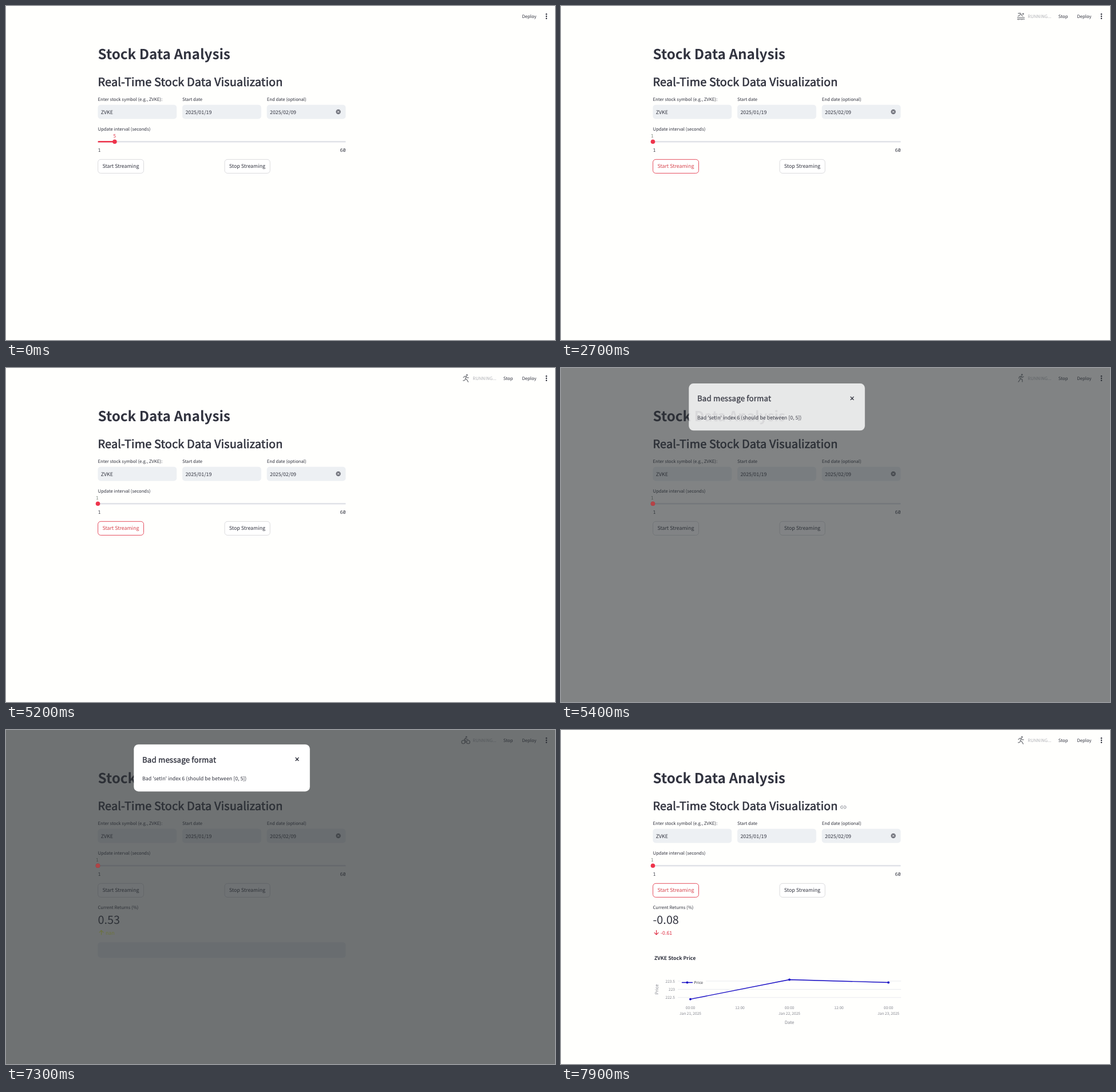
Recreate the animation shown at these times as an HTML page. Size 959 by 584 pixels, loop 8000 ms.

```html
<!DOCTYPE html>
<html lang="en">
<head>
<meta charset="utf-8">
<title>Stock Data Analysis</title>
<style>
  html, body { margin: 0; width: 100%; height: 100%; overflow: hidden; background: #fffffd; }
  svg { display: block; width: 959px; height: 584px; }
  text {
    font: 8.81px "Noto Sans CJK JP", "Noto Sans CJK SC", "Noto Sans CJK", "Noto Sans", sans-serif;
    fill: #31333f; text-rendering: geometricPrecision; white-space: pre;
  }
  .h1 { font-size: 24.23px; font-weight: 700; letter-spacing: .02px; }
  .h2 { font-size: 19.82px; letter-spacing: .18px; stroke: #31333f; stroke-width: .65px; }
  .h3 { font-size: 13.21px; letter-spacing: .18px; stroke: #31333f; stroke-width: .42px; }
  .small { font-size: 7.71px; }
  .mono { font: 8.4px "Noto Sans Mono", "DejaVu Sans Mono", monospace; }
  .value { font-size: 19.82px; }
  .bold { font-weight: 700; }
  .tick { font-size: 6.61px; fill: #84868f; }
  .axis { font-size: 7.71px; fill: #84868f; }
  .mid { text-anchor: middle; }
  .end { text-anchor: end; }
  .line { fill: none; stroke-linecap: round; stroke-linejoin: round; }
  .field { fill: #edf0f3; }
  .button { fill: #fff; stroke: #d6d6da; stroke-width: .9; }
  .sport { stroke: #7c7e83; stroke-width: 1.3; }
  .sport circle.head { fill: #7c7e83; stroke: none; }
</style>
</head>
<body>
<svg viewBox="0 0 959 584">
  <rect width="959" height="584" fill="#fffffd"/>

  <g id="running">
    <g id="runA" class="sport line">
      <circle class="head" cx="805.2" cy="12.2" r="1.5"/>
      <path d="M804 14.6L802.4 18.6L805.2 20.6L807.4 24.4M802.4 18.6L801.4 21.6L798.6 22M799 16.6L801.4 14.4L804 14.6L805.4 16.8L808 17"/>
    </g>
    <g id="runB" class="sport line">
      <circle class="head" cx="805.2" cy="11.8" r="1.5"/>
      <path d="M804 14.4L802.4 18.8L805.6 19.8L805.8 24M802.4 18.8L800.8 21.8L799 24.2M799.8 18L801 14.8L804 14.4L805.8 16.4L808 15"/>
    </g>
    <g id="swimA" class="sport line">
      <circle class="head" cx="806.8" cy="15.4" r="1.5"/>
      <path d="M799 12.4L802.6 12L804.6 15.4L799 18.2M797.4 20.6q1.5-1.3 3 0t3 0t3 0t3 0M797.4 23.4q1.5-1.3 3 0t3 0t3 0t3 0"/>
    </g>
    <g id="swimB" class="sport line">
      <circle class="head" cx="807.2" cy="13.8" r="1.5"/>
      <path d="M798.6 12.8L802.4 12.5L806 17.8M803.2 14.4L798.4 18M797.4 20.3q1.5 1 3 0t3 0t3 0t3 0M797.4 23.1q1.5 1 3 0t3 0t3 0t3 0"/>
    </g>
    <g id="bikeA" class="sport line">
      <circle class="head" cx="804.2" cy="12.2" r="1.4"/>
      <circle cx="798.8" cy="21" r="2.9"/><circle cx="807.4" cy="21" r="2.9"/>
      <path d="M806.8 16.4L804.4 16.2L802.8 14.2L800.4 16.8L803 18.6L802.8 22"/>
    </g>
    <g id="bikeB" class="sport line">
      <circle class="head" cx="804.6" cy="12.4" r="1.4"/>
      <circle cx="798.8" cy="21" r="2.9"/><circle cx="807.4" cy="21" r="2.9"/>
      <path d="M806.8 16.6L804.6 16.4L802.8 14.4L800.4 17L803.6 17.8L801.8 20.8"/>
    </g>
    <text class="small" x="815.3" y="21" style="fill:#afb0b5">RUNNING...</text>
    <text class="small" x="868.8" y="21">Stop</text>
  </g>
  <text class="small" x="901.4" y="21">Deploy</text>
  <g fill="#31333f"><circle cx="944" cy="14.2" r="1.25"/><circle cx="944" cy="18" r="1.25"/><circle cx="944" cy="21.8" r="1.25"/></g>

  <text class="h1" x="160.5" y="93">Stock Data Analysis</text>
  <text class="h2" x="160.5" y="140">Real-Time Stock Data Visualization</text>
  <path id="link" class="line" stroke="#8e9099" d="M492 132.7h-1.3a2.3 2.3 0 0 0 0 4.6h1.3M494.5 132.7h1.3a2.3 2.3 0 0 1 0 4.6h-1.3M491.2 135h4.1"/>

  <text class="small" x="160.5" y="165.8">Enter stock symbol (e.g., ZVKE):</text>
  <text class="small" x="308" y="165.8">Start date</text>
  <text class="small" x="455.7" y="165.8">End date (optional)</text>
  <rect class="field" x="160.4" y="172.8" width="137.8" height="24.6" rx="4.9"/>
  <rect class="field" x="308" y="172.8" width="137.8" height="24.6" rx="4.9"/>
  <rect class="field" x="455.6" y="172.8" width="137.8" height="24.6" rx="4.9"/>
  <text x="165.8" y="188.5">ZVKE</text>
  <text x="313.4" y="188.5">2025/01/19</text>
  <text x="461" y="188.5">2025/02/09</text>
  <circle cx="580.5" cy="185" r="4.2" fill="#70727b"/>
  <path class="line" stroke="#fff" d="M579 183.5l3 3m0-3l-3 3"/>

  <text class="small" x="160.5" y="217.6">Update interval (seconds)</text>
  <rect x="160.5" y="236.1" width="433" height="2.5" rx="1.2" fill="#e0e2e7"/>
  <rect id="fill" x="160.5" y="236.1" height="2.5" rx="1.2" fill="#ee344b"/>
  <circle id="thumb" cy="237.3" r="3.8" fill="#ee344b"/>
  <text id="count" class="mono mid" y="230.2"></text>
  <text class="mono" x="160.6" y="255">1</text>
  <text class="mono end" x="593.6" y="255">60</text>

  <rect id="start" class="button" x="160.6" y="268.3" width="79.9" height="24.1" rx="4.9"/>
  <text id="startText" x="168.4" y="283.4">Start Streaming</text>
  <rect class="button" x="382" y="268.3" width="79.2" height="24.1" rx="4.9"/>
  <text x="389.8" y="283.4">Stop Streaming</text>

  <g id="metric">
    <text class="small" x="160.5" y="313">Current Returns (%)</text>
    <text id="returns" class="value" x="160.5" y="339.3"></text>
    <path id="arrow" class="line" stroke-width="1.2"/>
    <text id="delta" x="174" y="357.7"></text>
  </g>
  <rect id="skeleton" class="field" x="160.4" y="371.3" width="433" height="27" rx="4.9"/>

  <g id="chart">
    <text class="bold" x="163" y="401.5">ZVKE Stock Price</text>
    <path stroke="#e7e9ee" stroke-width=".9" d="M204 439H594M204 453.5H594M204 467.8H594"/>
    <rect x="209" y="433" width="44" height="17" fill="#fffffd"/>
    <g fill="#1207c4">
      <path class="line" stroke="#1207c4" stroke-width="1.35" d="M226 470.7L399 436.5L572 441.5M211.5 441.5H229.5"/>
      <circle cx="226" cy="470.7" r="1.9"/><circle cx="399" cy="436.5" r="1.9"/>
      <circle cx="572" cy="441.5" r="1.9"/><circle cx="220.5" cy="441.5" r="1.9"/>
    </g>
    <text class="tick" x="232.6" y="444.2" style="fill:#31333f">Price</text>
    <text class="tick end" x="199" y="441.6">223.5</text>
    <text class="tick end" x="199" y="456.1">223</text>
    <text class="tick end" x="199" y="470.4">222.5</text>
    <text class="tick mid" x="226" y="488">00:00</text>
    <text class="tick mid" x="312.5" y="488">12:00</text>
    <text class="tick mid" x="399" y="488">00:00</text>
    <text class="tick mid" x="485.5" y="488">12:00</text>
    <text class="tick mid" x="572" y="488">00:00</text>
    <text class="tick mid" x="226" y="498">Jan 21, 2025</text>
    <text class="tick mid" x="399" y="498">Jan 22, 2025</text>
    <text class="tick mid" x="572" y="498">Jan 23, 2025</text>
    <text class="axis mid" x="399" y="514">Date</text>
    <text class="axis mid" transform="translate(170 453.5) rotate(-90)">Price</text>
  </g>

  <g id="shade">
    <rect width="959" height="584" fill="#2b3033" opacity=".68"/>
    <circle cx="160.5" cy="237.3" r="3.8" fill="#b04446"/>
  </g>
  <g id="dialog">
    <rect x="223.3" y="25.2" width="307.5" height="82.2" rx="8" fill="#fff"/>
    <text class="h3" x="238" y="56.5">Bad message format</text>
    <path class="line" stroke="#31333f" stroke-width="1.4" d="M506 48.5l5 5m0-5l-5 5"/>
    <text x="238" y="88">Bad 'setIn' index 6 (should be between [0, 5])</text>
  </g>
</svg>
<script>
const LOOP = 8000, STEP = 100;
const RED = '#e23a4c';
const el = Object.fromEntries([...document.querySelectorAll('[id]')].map(e => [e.id, e]));
const show = (e, on) => { e.style.display = on ? '' : 'none'; };
const clamp = v => Math.max(0, Math.min(1, v));

// [start time, value] pairs, each value held until the next one
const at = (track, t) => track.reduce((v, [from, next]) => t >= from ? next : v, track[0][1]);

const slider = [[0, 5], [100, 4], [300, 3], [500, 2], [700, 1]];
const button = [[0, 'idle'], [1200, 'focus'], [1400, 'down'], [1600, 'focus'], [5400, 'idle'], [7700, 'focus']];
const sports = ['runA', 'runB', 'swimA', 'swimB', 'bikeA', 'bikeB'];
const sport = [
  [0, 'runA'], [2400, 'swimA'], [2700, 'swimB'], [3100, 'swimA'], [3500, 'bikeA'], [3800, 'bikeB'],
  [4100, 'swimA'], [4400, 'bikeA'], [4600, 'bikeB'], [4800, 'swimA'], [5000, 'swimB'], [5200, 'runA'],
  [5400, 'runB'], [6000, 'runA'], [6300, 'runB'], [6500, 'runA'], [6800, 'runB'], [7000, 'bikeB'],
  [7300, 'bikeA'], [7600, 'runB'], [7900, 'runA']
];
const looks = {
  idle: ['#fff', '#d6d6da', '#31333f'],
  focus: ['#fff', RED, '#d6404a'],
  down: ['#ee384f', '#ee384f', '#ffe3e5']
};

function drawSlider(n) {
  const x = 160.5 + (n - 1) / 59 * 433;
  el.fill.setAttribute('width', x - 160.5);
  el.thumb.setAttribute('cx', x);
  el.count.setAttribute('x', n > 1 ? x : 159.3);
  el.count.textContent = n;
  el.count.style.fill = n > 1 ? RED : '#7f8a7d';
}

function drawMetric(updated) {
  const color = updated ? '#de2c42' : '#f4ff50';
  el.returns.textContent = updated ? '-0.08' : '0.53';
  el.delta.textContent = updated ? '-0.61' : 'nan';
  el.delta.style.fill = color;
  el.arrow.setAttribute('stroke', color);
  el.arrow.setAttribute('d', updated
    ? 'M166.6 350.4v7.4m-3.4-3.4l3.4 3.4l3.4-3.4'
    : 'M166.6 357.8v-7.4m-3.4 3.4l3.4-3.4l3.4 3.4');
}

function drawDialog(t) {
  const opening = t < 5400 ? 0 : 0.88 + 0.12 * clamp((t - 5400) / 200);
  const p = opening * clamp(1 - (t - 7550) / 200);
  el.shade.setAttribute('opacity', p);
  el.dialog.setAttribute('opacity', p ** 1.6);
  el.dialog.setAttribute('transform', `translate(0 ${16 * (1 - p)})`);
}

function render(t) {
  const updated = t >= 7700;
  drawSlider(at(slider, t));
  const [fill, stroke, text] = looks[at(button, t)];
  el.start.style.fill = fill;
  el.start.style.stroke = stroke;
  el.startText.style.fill = text;
  show(el.running, t >= 2100);
  const active = at(sport, t);
  sports.forEach(id => show(el[id], id === active));
  show(el.metric, t >= 5700);
  show(el.skeleton, t >= 5700 && !updated);
  show(el.chart, updated);
  show(el.link, updated);
  drawMetric(updated);
  drawDialog(t);
}

const origin = performance.now();
function frame() {
  const t = (performance.now() - origin) % LOOP;
  render(Math.floor(t / STEP) * STEP);
  requestAnimationFrame(frame);
}
frame();
</script>
</body>
</html>
```
